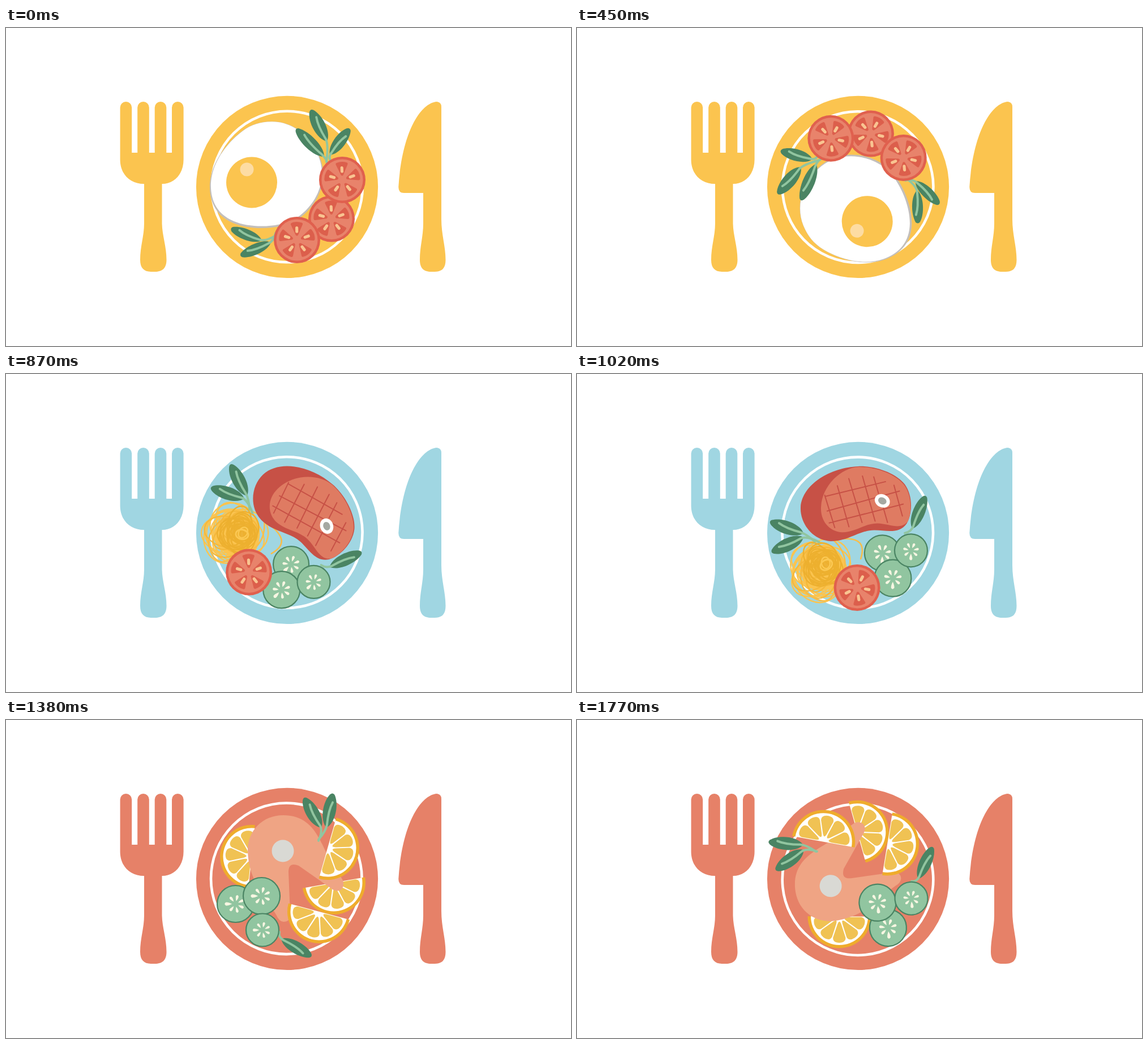
These frames come from a looping animation (998x561 px, 1.8 s). An HTML page:

```html
<!DOCTYPE html>
<html lang="en">
<head>
<meta charset="utf-8">
<title>Changing plates</title>
<style>
  html, body { margin: 0; width: 100%; height: 100%; overflow: hidden; background: #fff; }
  svg { display: block; width: 100vw; height: 100vh; }
</style>
</head>
<body>
<svg id="stage" viewBox="0 0 998 561"></svg>
<script>
const GREEN = '#4a8463', MINT = '#91c5a0', YELLOW = '#fbc44f', MEAT = '#c75146';
const CX = 496.5, CY = 280.4;

const circle = (x, y, r, fill, extra = '') =>
  `<circle cx="${x}" cy="${y}" r="${r}" fill="${fill}" ${extra}/>`;
const shape = (d, fill) => `<path d="${d}" fill="${fill}"/>`;
const line = (d, color, width) =>
  `<path d="${d}" fill="none" stroke="${color}" stroke-width="${width}" stroke-linecap="round" stroke-linejoin="round"/>`;
const group = (content, transform) => `<g transform="${transform}">${content}</g>`;
const times = (n, fn) => Array.from({ length: n }, (_, i) => fn(i)).join('');
const ring = (x, y) => circle(x, y, 133.3, 'none', 'stroke="#fff" stroke-width="4.6"');

function randomizer(seed) {
  return () => (seed = (seed * 16807) % 2147483647) / 2147483647;
}

// Leaf from base to tip, with a vein that runs on into the stem.
function leaf(tx, ty, bx, by, ex, ey, width = 14.5) {
  const dx = tx - bx, dy = ty - by, len = Math.hypot(dx, dy);
  const at = (k, side) =>
    `${(bx + dx * k - dy / len * side).toFixed(1)} ${(by + dy * k + dx / len * side).toFixed(1)}`;
  const body = `M${bx} ${by}C${at(.18, width)} ${at(.72, width)} ${at(.96, 4)}` +
    `Q${at(1.03, 0)} ${at(.95, -4)}C${at(.72, -width)} ${at(.18, -width)} ${bx} ${by}Z`;
  return shape(body, GREEN) +
    line(`M${at(.74, 3)}Q${at(.5, -2)} ${at(.08, 0)}Q${at(-.1, 0)} ${ex} ${ey}`, MINT, 4);
}

function tomato(x, y, turn) {
  const slice = '<path d="M10 0L28 -8Q31 0 28 8Z" fill="#dc5f4c" stroke="#dc5f4c" stroke-width="5" stroke-linejoin="round"/>' +
    line('M15 0H21.5', '#f9c491', 5.2);
  return group(circle(0, 0, 41, '#e0604e') + circle(0, 0, 36.5, '#e8836b') +
    times(5, i => group(slice, `rotate(${turn + i * 72})`)), `translate(${x} ${y})`);
}

// Seven drops around the middle; the one on the left is the longest.
function cucumber(x, y, r) {
  const drop = shape('M5 0Q11 -2.9 14 -2.2Q17 0 14 2.2Q11 2.9 5 0Z', '#f7f6e2');
  const seeds = times(7, i => group(drop, `rotate(${180 + i * 360 / 7}) scale(${i ? 1 : 1.22})`));
  return group(circle(0, 0, r - 1, MINT, `stroke="${GREEN}" stroke-width="2.2"`) +
    group(seeds, `scale(${r / 33})`), `translate(${x} ${y})`);
}

// Half slice; the axis points from the flat edge to the peel.
function lemon(x, y, axis) {
  const half = r => `M0 ${-r}A${r} ${r} 0 0 1 0 ${r}Z`;
  const part = shape('M9 0Q10 -2 14 -3.4L37 -11Q46 -12 46.5 0Q46 12 37 11L14 3.4Q10 2 9 0Z', '#f0c253');
  return group(shape(half(56), '#efac2c') + shape(half(50.5), '#fff') +
    times(5, i => group(part, `rotate(${-72 + i * 36})`)), `translate(${x} ${y}) rotate(${axis})`);
}

function pasta() {
  const rnd = randomizer(41);
  const loops = (n, x, y, spread, min, max, color) => times(n, () => {
    const px = x + (rnd() - .5) * spread, py = y + (rnd() - .5) * spread;
    const rx = min + rnd() * (max - min), ry = rx * (.65 + rnd() * .3);
    return `<ellipse rx="${rx}" ry="${ry}" fill="none" stroke="${color}" stroke-width="2.4"
      transform="translate(${px} ${py}) rotate(${rnd() * 180})"/>`;
  });
  return circle(435, 220, 38, YELLOW) +
    loops(24, 431, 213, 26, 30, 47, YELLOW) +
    loops(7, 434, 214, 34, 24, 44, '#f4b83d') +
    line('M392 190C365 215 372 245 405 240C430 268 462 262 484 236C490 276 484 296 451 286', '#f8bd49', 2.6) +
    circle(440, 222, 17, '#eeb338') +
    loops(20, 439, 220, 22, 9, 33, '#edb02f') +
    loops(3, 441, 223, 5, 4, 12, '#fbc853');
}

function eggDish() {
  const egg = 'M470 165C510 165 545 195 557 236C568 276 548 318 510 341C480 356 432 357 401 344C371 331 359 307 360 276C362 238 390 202 417 182C433 170 450 165 470 165Z';
  return ring(496.5, 280) +
    shape(egg, '#c3bfbb') +
    group(shape(egg, '#fff'), 'translate(9.1 3.6) scale(.98)') +
    circle(434, 272.5, 45, YELLOW) + circle(425.5, 249.5, 12, '#fddca3') +
    leaf(538, 144, 567, 200, 566, 236) + leaf(512, 178, 562, 227, 567, 238, 13.5) +
    leaf(607, 177, 572, 224, 574, 234, 13) +
    leaf(397, 354, 452, 375, 475, 367, 12) + leaf(414, 402, 468, 378, 476, 362, 12) +
    tomato(575, 336.5, -92) + tomato(594, 268, -92) + tomato(514, 374, -91);
}

function steakDish() {
  const steak = 'M540 178C512 177 482 200 481 232C481 264 501 281 502 309C502 333 496 353 515 366C533 376 564 376 584 361C604 345 616 307 614 278C611 230 581 180 540 178Z';
  const inner = 'M541 214C518 213 498 228 497 252C498 277 513 290 514 314C514 336 502 355 519 368C536 375 566 374 584 359C603 342 614 307 613 279C611 248 579 215 541 214Z';
  const grid = 'M560 222L588 327M534 225L572 352M513 229L549 359M562 220L505 239M579 242L507 264' +
    'M592 262L515 287M597 286L518 310M596 306L567 315M542 324L516 332M582 342L528 358';
  return ring(497, 279.6) + pasta() +
    leaf(459, 128, 487, 184, 479, 212) + leaf(513, 124, 494, 184, 480, 204) +
    leaf(565, 398, 506, 376, 498, 363, 13.5) +
    shape(steak, MEAT) + shape(inner, '#df7b62') + line(grid, MEAT, 2) +
    group('<ellipse rx="11.5" ry="13.8" fill="#fff"/><ellipse rx="6" ry="7.6" fill="#a5a8a2"/>',
      'translate(554 322) rotate(25)') +
    cucumber(462, 324, 32.5) + cucumber(418, 343.5, 33.5) + cucumber(467.5, 374.5, 30) +
    tomato(400, 280.5, 26);
}

function salmonDish() {
  const fish = 'M427 230C427 195 453 168 490 168C530 168 546 194 559 220C570 245 586 266 595 283C600 297 588 306 577 299L517 257Q499 250 499 268L502 343Q502 356 490 356Q482 355 478 345C464 318 428 288 427 230Z';
  return ring(495.3, 279.8) +
    lemon(434, 241, 186) + lemon(579, 287, 80) +
    shape(fish, '#efa484') + circle(489, 231, 19.5, '#d9d9d4') +
    lemon(568, 226, 16) + lemon(553, 338, 105) +
    leaf(526, 137, 557, 190, 552, 213) + leaf(577, 129, 566, 190, 552, 211) +
    leaf(540, 417, 486, 386, 483, 374, 13.5) +
    cucumber(405.5, 324.5, 33.5) + cucumber(451.5, 310.5, 33.5) + cucumber(453, 370.5, 30);
}

// "pose" is the phase of the turn at which each dish is drawn upright.
const dishes = [
  { color: '#fbc44f', pose: 0, art: eggDish() },
  { color: '#a0d6e2', pose: .2, art: steakDish() },
  { color: '#e68168', pose: .3, art: salmonDish() }
];

const tine = x => `V140.3A10.3 10.3 0 0 1 ${x + 20.6} 140.3`;
const fork = `M201.6 232${tine(201.6)}V220H232.2${tine(232.2)}V220H262.7${tine(262.7)}V220H293${tine(293)}` +
  'V232C313.6 257 298 275 275.5 275V345C276 367 283.5 385 283.5 409C283.5 424 276 430 263 430H257' +
  'C244 430 237 424 237 409C237 385 244 367 244 345V275C218 275 201.6 257 201.6 232Z';
const knife = 'M769 139Q769 130 760 130C730 134 699 188 693.3 280Q693 291 703 291H737V345' +
  'C737 368 731 385 731 409C731 424 738 430 751 430H757C770 430 776.5 424 776.5 409C776.5 385 769 365 769 337Z';

const stage = document.getElementById('stage');
stage.innerHTML = shape(fork, 'currentColor') + shape(knife, 'currentColor') +
  circle(CX, CY, 160.6, 'currentColor') +
  dishes.map(d => `<g class="dish">${d.art}</g>`).join('');
const layers = [...stage.querySelectorAll('.dish')];

// Turn within one dish: phase, degrees, speed.
const turnKeys = [[0, 0, 55], [.2, 17.7, 140], [.35, 44.4, 182],
  [.7, 106.5, 130], [.75, 112.1, 112], [1, 134, 60]];

function turn(u) {
  let i = 0;
  while (i < turnKeys.length - 2 && u >= turnKeys[i + 1][0]) i++;
  const [u0, a, va] = turnKeys[i], [u1, b, vb] = turnKeys[i + 1];
  const h = u1 - u0, s = (u - u0) / h, e = s * s * (3 - 2 * s);
  return a + (b - a) * e + h * (va * s * (1 - s) ** 2 - vb * s * s * (1 - s));
}

const STEP = 30, DISH = 600, LOOP = 1800;
const start = performance.now();

function draw(now) {
  const t = Math.floor(Math.max(0, now - start) % LOOP / STEP) * STEP;
  const index = Math.floor(t / DISH), dish = dishes[index];
  const angle = turn(dish.pose) - turn(t % DISH / DISH);
  stage.style.color = dish.color;
  layers.forEach((g, i) => g.style.display = i === index ? '' : 'none');
  layers[index].setAttribute('transform', `rotate(${angle} ${CX} ${CY})`);
  requestAnimationFrame(draw);
}
draw(start);
</script>
</body>
</html>
```
